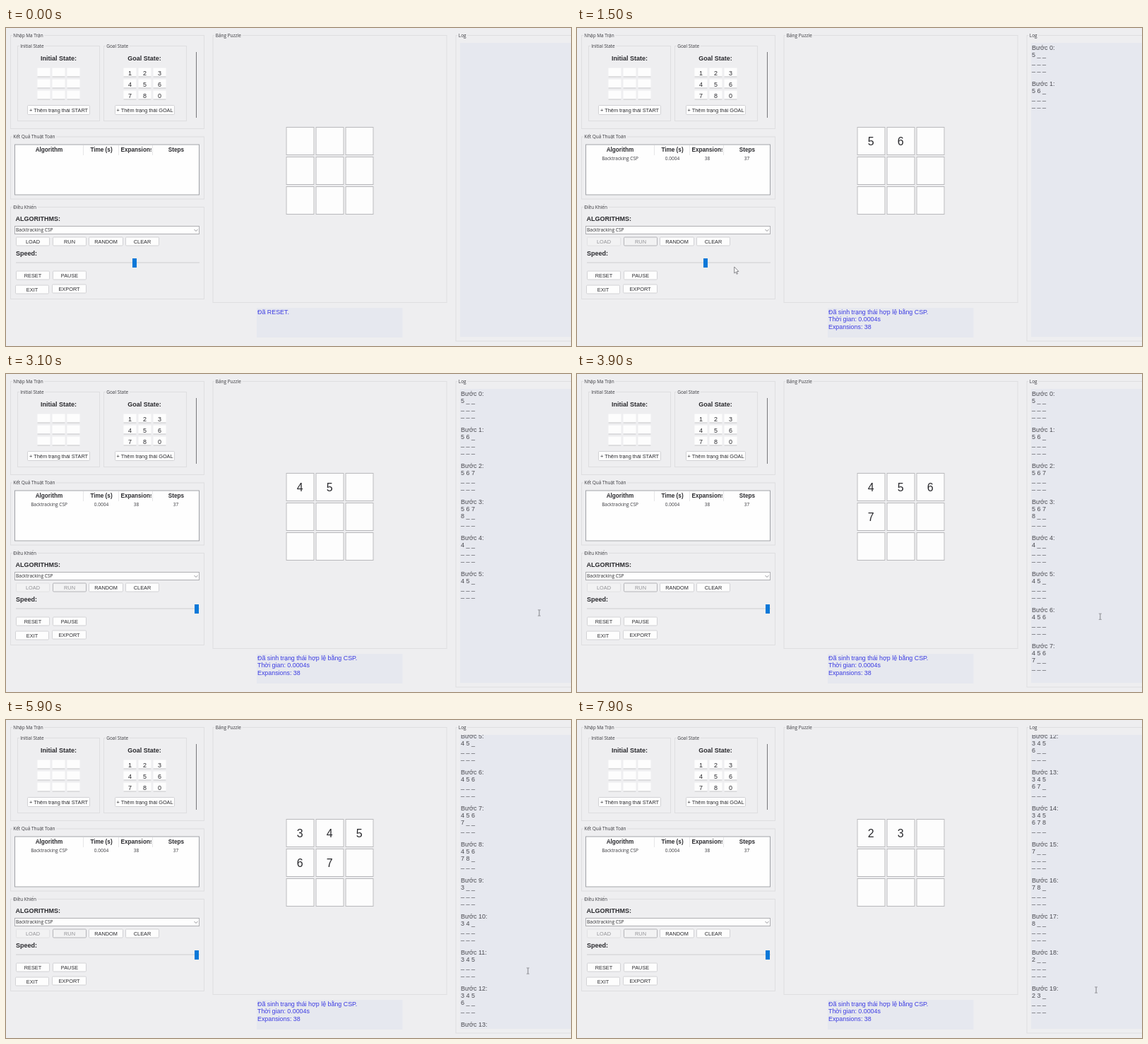
Write an HTML page with a canvas that moves like this. It is 800x450 px and loops after 8 s.

```html
<!DOCTYPE html>
<html lang="vi">
<head>
<meta charset="utf-8">
<title>Puzzle CSP</title>
<style>
html, body { margin: 0; width: 100%; height: 100%; overflow: hidden; background: #eeeef0; }
canvas { display: block; width: 800px; height: 450px; }
</style>
</head>
<body>
<canvas id="stage" width="800" height="450"></canvas>
<script>
const ctx = document.getElementById('stage').getContext('2d');
const LOOP = 8000;
const BG = '#eeeef0', PANEL = '#e6e8ef', INK = '#2a2a2e';
const ARIAL = '"Liberation Sans", Arial, sans-serif';
const UI = '"Open Sans", "Noto Sans", sans-serif';

const CLICK_RUN = 900, SOLVED = 1000;
const SCROLL_LAG = 230, LINE = 10.2, BLOCK = 51;

// Each run grows one digit at a time from its first digit: [first, length]
const steps = [];
for (const [first, len] of [[5, 4], [4, 5], [3, 6], [7, 2], [8, 1], [2, 2]]) {
  for (let k = 1; k <= len; k++) {
    steps.push(Array.from({ length: k }, (_, i) => first + i));
  }
}
const stepTime = n => n < 2 ? SOLVED + 480 * n : 2022 + 332 * (n - 2);

const pointer = [
  [100, 45, 352], [550, 92, 304], [950, 92, 304], [1500, 223, 338],
  [1650, 182, 334], [1950, 270, 334], [2400, 793, 308], [2800, 784, 326],
  [3100, 755, 338], [3700, 741, 342], [4700, 740, 348], [5900, 739, 355],
  [6800, 734, 372], [7900, 735, 382]
];

function lastStep(t) {
  let n = -1;
  while (n + 1 < steps.length && stepTime(n + 1) <= t) n++;
  return n;
}

function pointerAt(t) {
  if (t < pointer[0][0]) return null;
  for (let i = 1; i < pointer.length; i++) {
    const [t0, x0, y0] = pointer[i - 1], [t1, x1, y1] = pointer[i];
    if (t <= t1) {
      const p = (t - t0) / (t1 - t0);
      return [x0 + (x1 - x0) * p, y0 + (y1 - y0) * p];
    }
  }
  return pointer[pointer.length - 1].slice(1);
}

function text(str, x, mid, size, { color = INK, align = 'left', bold = false, family = ARIAL } = {}) {
  ctx.font = `${bold ? 'bold ' : ''}${size}px ${family}`;
  ctx.fillStyle = color;
  ctx.textAlign = align;
  ctx.fillText(str, x, mid + size * 0.36);
}

function fill(x, y, w, h, color) {
  ctx.fillStyle = color;
  ctx.fillRect(x, y, w, h);
}

function box(x, y, w, h, bg, edge) {
  fill(x, y, w, h, bg);
  ctx.strokeStyle = edge;
  ctx.lineWidth = 1;
  ctx.strokeRect(x + 0.5, y + 0.5, w - 1, h - 1);
}

function group(label, x, y, w, h) {
  box(x, y, w, h, BG, '#dedee0');
  ctx.font = `6.45px ${UI}`;
  fill(x + 3, y - 2, ctx.measureText(label).width + 3, 5, BG);
  text(label, x + 4.3, y + 0.3, 6.45, { family: UI, color: '#3a3a3f' });
}

function button(label, x, y, w, h, state = '') {
  const off = state !== '';
  ctx.beginPath();
  ctx.roundRect(x + 0.5, y + 0.5, w - 1, h - 1, 1.2);
  ctx.fillStyle = off ? '#f2f2f3' : '#fdfdfd';
  ctx.fill();
  ctx.lineWidth = 1;
  ctx.strokeStyle = state === 'focus' ? '#b4b4b8' : off ? '#e2e2e4' : '#d2d2d5';
  ctx.stroke();
  text(label, x + w / 2, y + h / 2, 7.35, { align: 'center', color: off ? '#929296' : INK });
}

function entries(x, y, digits) {
  for (let i = 0; i < 9; i++) {
    const cx = x + (i % 3) * 21, cy = y + Math.floor(i / 3) * 16;
    fill(cx - 9, cy - 6, 18, 13, '#fdfdfd');
    fill(cx - 9, cy + 6, 18, 1, '#c2c2c5');
    if (digits) text(digits[i], cx, cy + 0.9, 9, { align: 'center' });
  }
}

function inputs() {
  group('Nhập Ma Trận', 6, 10, 275, 133);
  group('Initial State', 16, 25, 117, 107);
  group('Goal State', 138, 25, 118, 107);
  text('Initial State:', 74.5, 42.7, 9, { bold: true, align: 'center' });
  text('Goal State:', 196, 42.7, 9, { bold: true, align: 'center' });
  entries(53.5, 62.5);
  entries(175.5, 62.5, '123456780');
  button('+ Thêm trạng thái START', 30, 109, 89, 14);
  button('+ Thêm trạng thái GOAL', 154, 109, 85, 14);
  fill(269, 34, 1, 93, '#77777b');
}

function results(solved) {
  group('Kết Quả Thuật Toán', 6, 153.5, 275, 89);
  box(12, 164.5, 262, 72, '#fefefe', '#a0a2a7');
  for (const x of [109, 159, 207]) fill(x, 166, 1, 14, '#e6e6e8');
  const head = { bold: true, align: 'center' };
  text('Algorithm', 61, 171.8, 8.2, head);
  text('Time (s)', 135, 171.8, 8.2, head);
  text('Steps', 241, 171.8, 8.2, head);
  ctx.save();
  ctx.beginPath();
  ctx.rect(160, 165, 45.8, 15);
  ctx.clip();
  text('Expansions', 162.5, 171.8, 8.2, { bold: true });
  ctx.restore();
  if (!solved) return;
  const cell = { align: 'center', family: UI, color: '#3a3a3f' };
  text('Backtracking CSP', 61, 184.5, 6.5, cell);
  text('0.0004', 135, 184.5, 6.5, cell);
  text('38', 184.5, 184.5, 6.5, cell);
  text('37', 240.5, 184.5, 6.5, cell);
}

function controls(t, running) {
  group('Điều Khiển', 6, 253, 275, 131);
  text('ALGORITHMS:', 13.5, 270.2, 9, { bold: true });
  box(12, 280, 262, 12, '#fefefe', '#aeaeb2');
  text('Backtracking CSP', 14, 286, 6.6, { family: UI });
  ctx.strokeStyle = '#77777b';
  ctx.lineWidth = 0.8;
  ctx.beginPath();
  ctx.moveTo(266.5, 285);
  ctx.lineTo(269, 287.5);
  ctx.lineTo(271.5, 285);
  ctx.stroke();

  button('LOAD', 14, 295.5, 48, 13, running ? 'off' : '');
  button('RUN', 66, 295.5, 48, 13, running ? 'focus' : '');
  button('RANDOM', 117, 295.5, 49, 13);
  button('CLEAR', 169, 295.5, 48, 13);
  text('Speed:', 14, 318.5, 9, { bold: true });

  fill(14, 331, 260, 2, '#dedee0');
  const drag = Math.min(1, Math.max(0, (t - 1650) / 300));
  fill(179 + 88 * drag, 326, 6, 13, '#0b78d8');

  button('RESET', 14, 343.5, 48, 13);
  button('PAUSE', 66, 343.5, 48, 13);
  button('EXIT', 13, 363.5, 48, 13);
  button('EXPORT', 65, 362.5, 49, 13);
}

function board(n) {
  group('Bảng Puzzle', 292.5, 10, 332, 379);
  const digits = n < 0 ? [] : steps[n];
  for (let i = 0; i < 9; i++) {
    const x = 396 + (i % 3) * 42, y = 140 + Math.floor(i / 3) * 42;
    box(x + 0.5, y, 40, 40, '#fdfdfd', '#b8b8bb');
    if (i < digits.length) text(digits[i], x + 20.2, y + 20.6, 16, { align: 'center' });
  }
}

function status(t) {
  fill(355, 396, 206.5, 42, PANEL);
  const lines = t < CLICK_RUN ? ['Đã RESET.'] : ['Đã sinh trạng thái hợp lệ bằng CSP.'];
  if (t >= SOLVED) lines.push('Thời gian: 0.0004s', 'Expansions: 38');
  lines.forEach((s, i) => text(s, 356, 402 + i * LINE, 8.9, { color: '#3c3ce2' }));
}

function log(t, n) {
  group('Log', 636.5, 10, 180, 433.5);
  fill(643, 21, 157, 416, PANEL);
  const seen = lastStep(t - SCROLL_LAG);
  const offset = seen < 7 ? 0 : (seen - 7) * BLOCK + 5;
  ctx.save();
  ctx.beginPath();
  ctx.rect(643, 21, 157, 416);
  ctx.clip();
  const style = { color: '#4a4a50' };
  for (let k = 0; k <= n; k++) {
    const y = 27.6 + k * BLOCK - offset;
    text(`Bước ${k}:`, 644, y, 9, style);
    for (let r = 0; r < 3; r++) {
      const row = [0, 1, 2].map(c => steps[k][r * 3 + c] ?? '_').join(' ');
      text(row, 644, y + (r + 1) * LINE, 9, style);
    }
  }
  ctx.restore();
}

function arrow(x, y) {
  ctx.beginPath();
  [[0, 0], [0, 9], [2, 7.2], [3.4, 10.3], [4.8, 9.7], [3.4, 6.7], [6.2, 6.5]]
    .forEach(([dx, dy]) => ctx.lineTo(x + dx, y + dy));
  ctx.closePath();
  ctx.fillStyle = '#fbfbfb';
  ctx.fill();
  ctx.strokeStyle = '#6a6a6f';
  ctx.lineWidth = 0.8;
  ctx.stroke();
}

function beam(x, y) {
  fill(x - 0.4, y - 4, 0.9, 8, '#77777c');
  fill(x - 2, y - 4.5, 4, 0.8, '#88888d');
  fill(x - 2, y + 3.7, 4, 0.8, '#88888d');
}

function draw(t) {
  const n = lastStep(t);
  fill(0, 0, 800, 450, BG);
  inputs();
  results(t >= CLICK_RUN);
  controls(t, t >= CLICK_RUN);
  board(n);
  status(t);
  log(t, n);
  const p = pointerAt(t);
  if (p) (p[0] > 643 ? beam : arrow)(...p);
}

const start = performance.now();
function tick() {
  draw((performance.now() - start) % LOOP);
  requestAnimationFrame(tick);
}
tick();
</script>
</body>
</html>
```
